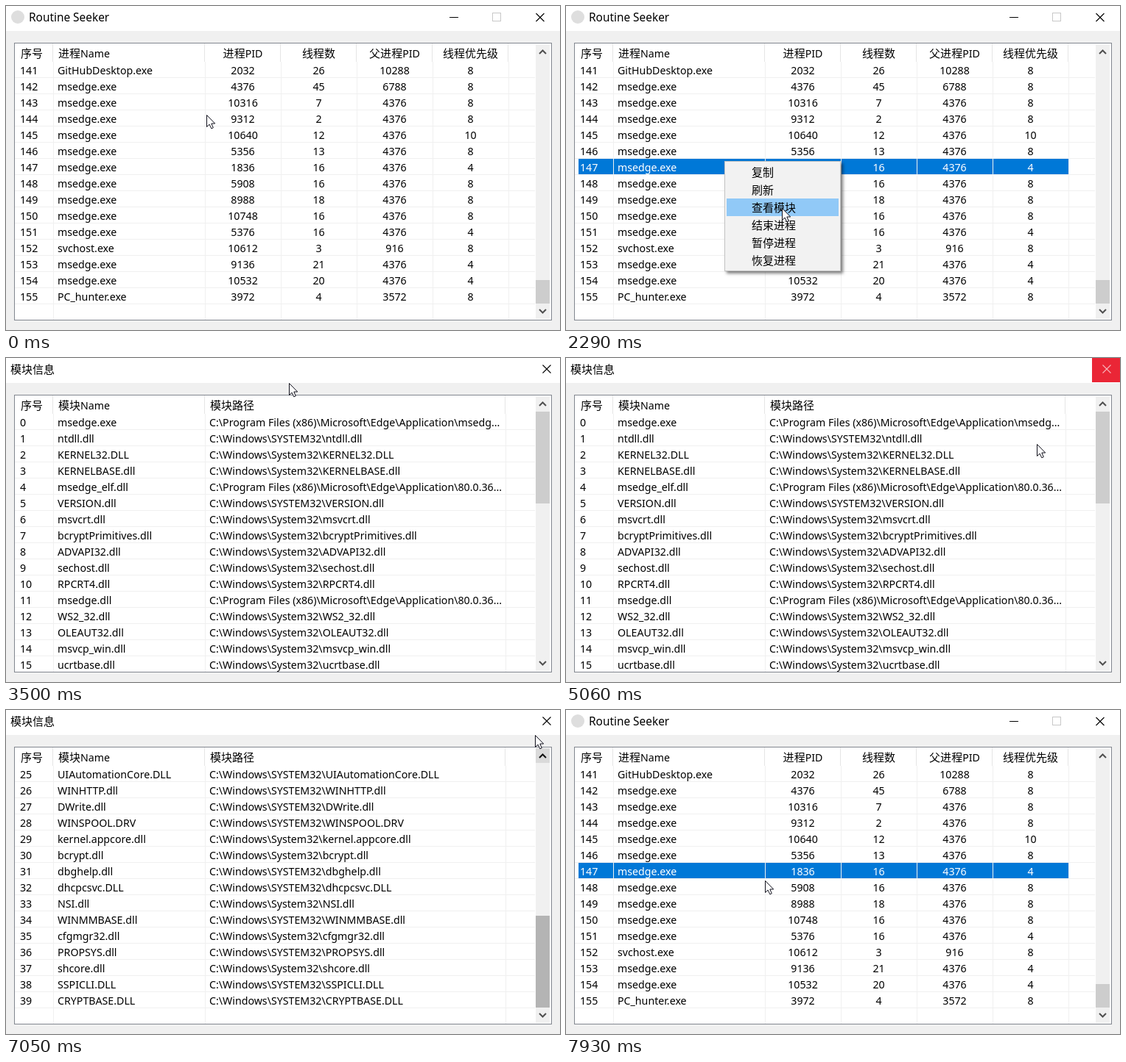
Animation, 752 px wide and 441 px high, one loop 8 s. Source, as an HTML page with a canvas:

```html
<!DOCTYPE html>
<html lang="zh-CN">
<head>
<meta charset="utf-8">
<title>Process list</title>
<style>
html, body { margin: 0; width: 100%; height: 100%; overflow: hidden; background: #f0f0f0; }
canvas { display: block; width: 752px; height: 441px; }
</style>
</head>
<body>
<canvas id="stage" width="752" height="441"></canvas>
<script>
const ctx = document.getElementById('stage').getContext('2d');
const LOOP = 8000, TICK = 110, TICK_START = 200;
const ROW = 22, TOP = 76, TRAVEL = 207;
const LATIN = '"Noto Sans", "Open Sans", sans-serif';
const HAN = '"Noto Sans CJK SC", "Noto Sans CJK", sans-serif';

// Moments of the story, in ms
const SELECT = 640, MENU = 1630, MENU_END = 2840, OPEN = 2950;
const GRAB = 5590, RELEASE = 6250, CLOSE = 7350;

const processes = `GitHubDesktop.exe 2032 26 10288 8
msedge.exe 4376 45 6788 8
msedge.exe 10316 7 4376 8
msedge.exe 9312 2 4376 8
msedge.exe 10640 12 4376 10
msedge.exe 5356 13 4376 8
msedge.exe 1836 16 4376 4
msedge.exe 5908 16 4376 8
msedge.exe 8988 18 4376 8
msedge.exe 10748 16 4376 8
msedge.exe 5376 16 4376 4
svchost.exe 10612 3 916 8
msedge.exe 9136 21 4376 4
msedge.exe 10532 20 4376 4
PC_hunter.exe 3972 4 3572 8`.split('\n').map((line, i) => [141 + i, ...line.split(' ')]);

// "*" marks the upper-case system folder, "+" the browser folder
const folders = { '*': 'C:\\Windows\\SYSTEM32\\', '+': 'C:\\Program Files (x86)\\Microsoft\\Edge\\Application\\' };
const modules = `+msedge.exe *ntdll.dll KERNEL32.DLL KERNELBASE.dll +msedge_elf.dll *VERSION.dll
msvcrt.dll bcryptPrimitives.dll ADVAPI32.dll sechost.dll RPCRT4.dll +msedge.dll WS2_32.dll
OLEAUT32.dll msvcp_win.dll ucrtbase.dll combase.dll SHELL32.dll USER32.dll win32u.dll
GDI32.dll gdi32full.dll SHLWAPI.dll IMM32.DLL *dbgcore.DLL *UIAutomationCore.DLL
*WINHTTP.dll *DWrite.dll *WINSPOOL.DRV kernel.appcore.dll bcrypt.dll *dbghelp.dll
*dhcpcsvc.DLL NSI.dll *WINMMBASE.dll cfgmgr32.dll *PROPSYS.dll shcore.dll *SSPICLI.DLL
*CRYPTBASE.DLL`.split(/\s+/).map((entry, i) => {
  const mark = entry[0], name = entry.replace(/^[*+]/, '');
  const tail = mark === '+' ? (i ? '80.0.36...' : 'msedg...') : name;
  return [i, name, (folders[mark] || 'C:\\Windows\\System32\\') + tail];
});

const menuItems = ['复制', '刷新', '查看模块', '结束进程', '暂停进程', '恢复进程'];
const processHeads = ['序号', '进程Name', '进程PID', '线程数', '父进程PID', '线程优先级'];
const processEdges = processHeads.map((_, i) => i ? 167 + 103 * i : 64);
const moduleHeads = ['序号', '模块Name', '模块路径'];
const moduleEdges = [64, 270, 678];

const ramp = (t, from, to) => Math.min(1, Math.max(0, (t - from) / (to - from)));
const snap = t => Math.max(0, TICK_START + TICK * Math.floor((t - TICK_START) / TICK));

// Glides from point to point; a later glide starts where the earlier one ends
function cursorAt(t) {
  let x = 272, y = 148;
  const glide = (from, to, tx, ty, bend = 0, power = 1) => {
    const p = ramp(t, from, to);
    x += (tx - x) * p - bend * Math.sin(Math.PI * p);
    y += (ty - y) * (1 - (1 - p) ** power);
  };
  glide(90, 530, 215, 211);
  glide(MENU, 2290, 293, 275);
  glide(MENU_END - TICK, 3500, 384, 34);
  glide(3610, 4490, 731, 14);
  glide(4930, 5370, 731, 154, 130, 4.6);
  glide(GRAB, 5920, 728, 361);
  glide(5920, RELEASE, 730, 407);
  glide(6360, 7020, 718, 34);
  glide(7020, 7240, 734, 14);
  glide(7240, 7900, 270, 232);
  return [x, y];
}

function rect(x, y, w, h, color) {
  ctx.fillStyle = color;
  ctx.fillRect(x, y, w, h);
}

function outline(x, y, w, h, color) {
  ctx.strokeStyle = color;
  ctx.lineWidth = 1;
  ctx.strokeRect(x + 0.5, y + 0.5, w - 1, h - 1);
}

function path(d, color, width) {
  ctx.strokeStyle = color;
  ctx.lineWidth = width;
  ctx.stroke(new Path2D(d));
}

// Draws mixed Chinese and Latin text, each run in its own font
function text(str, x, y, { color = '#000', center = false, size = 14.2 } = {}) {
  const runs = String(str).match(/[\u4e00-\u9fff]+|[^\u4e00-\u9fff]+/g).map(run => {
    const font = run.charCodeAt(0) > 0x4dff ? `15px ${HAN}` : `${size}px ${LATIN}`;
    ctx.font = font;
    return { run, font, width: ctx.measureText(run).width };
  });
  if (center) x -= runs.reduce((sum, r) => sum + r.width, 0) / 2;
  ctx.fillStyle = color;
  for (const r of runs) {
    ctx.font = r.font;
    ctx.fillText(r.run, x, y);
    x += r.width;
  }
}

function cross(x, y, color) {
  ctx.save();
  ctx.translate(x, y);
  path('M-5.5-5.5L5.5 5.5M-5.5 5.5L5.5-5.5', color, 1.1);
  ctx.restore();
}

function frame() {
  rect(0, 0, 752, 441, '#f0f0f0');
  rect(0, 0, 752, 34, '#fff');
  rect(11, 50, 730, 378, '#828790');
  rect(12, 51, 728, 376, '#fff');
}

function table(heads, edges, rows, selected = -1) {
  ctx.save();
  ctx.beginPath();
  ctx.rect(12, 51, 706, 376);
  ctx.clip();
  if (selected >= 0) rect(17, TOP + ROW * selected, 665, ROW - 1, '#0078d7');
  for (let y = TOP + ROW - 1; y < 428; y += ROW) rect(12, y, 706, 1, '#f0f0f0');
  heads.forEach((head, c) => {
    const edge = edges[c], left = (c ? edges[c - 1] : 13) + 6;
    const center = edge - left < 100;
    const middle = c > 1 && center;
    const x = middle ? edge - 51.5 : left;
    rect(edge - 1, 51, 1, 25, '#e5e5e5');
    rect(edge, TOP, 1, 352, '#f0f0f0');
    text(head, middle ? x : x + 1, 70, { center: middle });
    rows.forEach((row, r) => text(row[c], x, 93 + ROW * r,
      { color: r === selected ? '#fff' : '#000', center: middle }));
  });
  ctx.restore();
}

function scrollbar(y, height, color, upHover = false) {
  rect(719, 52, 19, 374, '#f0f0f0');
  if (upHover) rect(719, 52, 19, 20, '#dadada');
  rect(719, y, 19, height, color);
  path('M724 65L728.5 60.5L733 65', upHover ? '#111' : '#505050', 2);
  path('M724 413L728.5 417.5L733 413', '#505050', 2);
}

function processWindow(t) {
  frame();
  ctx.beginPath();
  ctx.arc(16, 15, 9, 0, 2 * Math.PI);
  ctx.fillStyle = '#dedede';
  ctx.fill();
  text('Routine Seeker', 31, 21, { size: 15.4 });
  rect(602, 15, 12, 1, '#000');
  outline(660, 9, 12, 12, '#c8c8c8');
  cross(725, 15.5, '#000');
  table(processHeads, processEdges, processes, t >= SELECT ? 6 : -1);
  scrollbar(373, 32, '#cdcdcd');
}

function menu(x, y) {
  ctx.save();
  ctx.shadowColor = 'rgba(0,0,0,0.5)';
  ctx.shadowBlur = 4;
  ctx.shadowOffsetX = ctx.shadowOffsetY = 3;
  rect(215, 211, 158, 150, '#f2f2f2');
  ctx.restore();
  outline(215, 211, 158, 150, '#c4c4c4');
  const hover = x > 217 ? Math.floor((y - 214) / 24) : -1;
  menuItems.forEach((item, i) => {
    if (i === hover) rect(218, 214 + 24 * i, 152, 24, '#91c9f7');
    text(item, 252, 232 + 24 * i);
  });
}

function thumbColor(t, x, y, top) {
  if (t > GRAB && t < RELEASE) return '#606060';
  if (x > 718 && y > top && y < top + 125) return '#a6a6a6';
  return t >= 6910 && t < 7130 ? '#b4b4b4' : '#cdcdcd';
}

function moduleWindow(t, x, y) {
  frame();
  text('模块信息', 6, 21);
  const glow = ramp(t, 4380, 4600) - ramp(t, 4930, 5300) ** 2 + ramp(t, 7020, 7240);
  if (glow > 0) rect(714, 0, 38, 33, `rgba(232,17,35,${glow})`);
  cross(734, 15, glow > 0.4 ? (glow < 1 ? '#f7b4ba' : '#fff') : '#000');

  const travel = t > RELEASE ? TRAVEL : t > GRAB ? Math.min(TRAVEL, y - 154) : 0;
  const first = Math.round(travel / TRAVEL * 25), top = 73 + travel;
  table(moduleHeads, moduleEdges, modules.slice(first, first + 16));
  scrollbar(top, 125, thumbColor(t, x, y, top), t >= 6910 && t < 7130);
}

function pointer(x, y) {
  ctx.save();
  ctx.translate(Math.round(x) + 0.5, Math.round(y) + 0.5);
  const arrow = 'M0 0V16L3.6 12.6L6.3 18.3L8.8 17.2L6.3 11.5H11.2Z';
  ctx.fillStyle = '#fff';
  ctx.fill(new Path2D(arrow));
  path(arrow, '#10101c', 1);
  ctx.restore();
}

const start = performance.now();
function draw() {
  const t = snap((performance.now() - start) % LOOP);
  const [x, y] = cursorAt(t);
  if (t >= OPEN && t < CLOSE) {
    moduleWindow(t, x, y);
  } else {
    processWindow(t);
    if (t >= MENU && t < MENU_END) menu(x, y);
  }
  pointer(x, y);
  requestAnimationFrame(draw);
}
draw();
</script>
</body>
</html>
```
